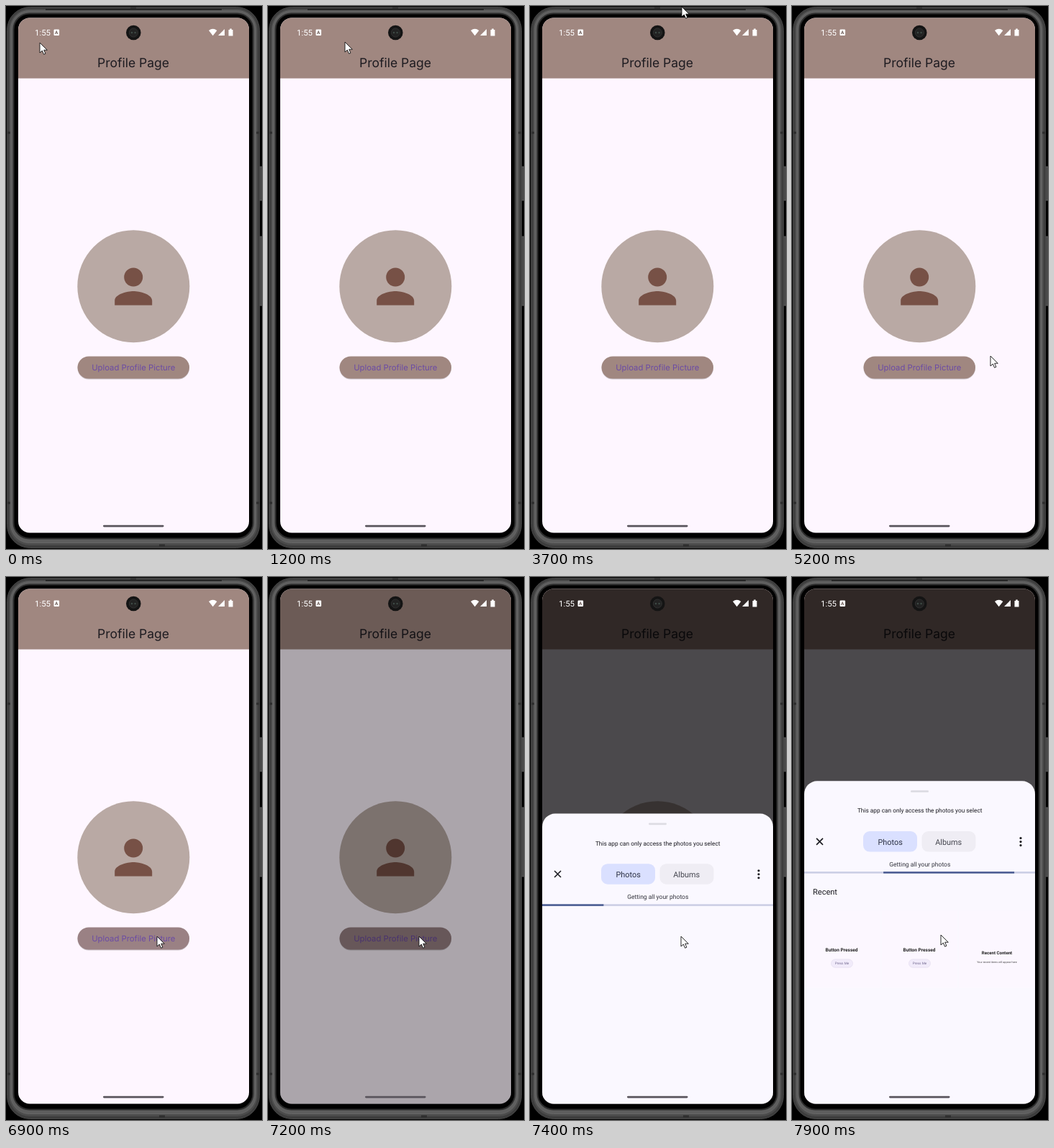
These frames come from a looping animation (356 by 754 pixels, 8 s). An HTML page:

```html
<!DOCTYPE html>
<html lang="en">
<head>
<meta charset="utf-8">
<title>Profile Page</title>
<style>
html, body { margin: 0; width: 100%; height: 100%; overflow: hidden; background: #000; }
svg { display: block; width: 356px; height: 754px; }
text { font-family: Roboto, sans-serif; text-rendering: geometricPrecision; text-anchor: middle; }
.brand { font-family: Inter, sans-serif; }
</style>
</head>
<body>
<svg viewBox="0 0 356 754" xmlns="http://www.w3.org/2000/svg">
  <defs>
    <clipPath id="screen"><rect x="17" y="16.5" width="321" height="715" rx="16"/></clipPath>
  </defs>

  <!-- phone body: nested outlines from the outer edge to the bezel -->
  <rect width="356" height="754"/>
  <g fill="#4a4a4a" stroke="#666" stroke-width=".7">
    <rect x="351" y="223" width="6" height="47" rx="1.5"/>
    <rect x="351" y="320" width="6" height="96" rx="1.5"/>
  </g>
  <rect x="1.5" y="1.5" width="351" height="751" rx="32" fill="#3d3d3d" stroke="#454545"/>
  <rect x="4" y="4" width="346" height="745" rx="29" fill="#4c4c4c"/>
  <rect x="6.5" y="6.5" width="341" height="739" rx="26" fill="#5e5e5e" stroke="#666"/>
  <rect x="10.5" y="10.5" width="333" height="729" rx="22" stroke="#2c2c2c" stroke-width="2"/>
  <path d="M55 5H300" stroke="#262626" stroke-width="2"/>
  <path d="M173 3h8M2 176h4M348 176h4M2 690h4M348 690h4M213 749h8" stroke="#2e2e2e" stroke-width="3"/>

  <g clip-path="url(#screen)">
    <rect x="17" y="16" width="321" height="716" fill="#fef6ff"/>
    <rect x="17" y="16" width="321" height="84.5" fill="#a08780"/>
    <text class="brand" x="177" y="85" font-size="17.5" fill="#1d1b20">Profile Page</text>
    <circle cx="177.3" cy="389.3" r="78" fill="#b9a9a4"/>
    <path transform="translate(138.2 350.5) scale(3.25)" fill="#775146"
      d="M12 12a4 4 0 1 0 0-8 4 4 0 0 0 0 8zm0 2c-2.67 0-8 1.34-8 4v2h16v-2c0-2.66-5.33-4-8-4z"/>
    <rect x="99.5" y="487.5" width="155.5" height="31" rx="15.5" fill="#000" opacity=".18"/>
    <rect x="99.5" y="486.5" width="155.5" height="31" rx="15.5" fill="#a08780"/>
    <rect id="hover" x="99.5" y="486.5" width="155.5" height="31" rx="15.5" fill="#6750a4"/>
    <text class="brand" x="177.3" y="506" font-size="11.3" fill="#6b4ba5">Upload Profile Picture</text>
    <rect id="scrim" x="17" y="16" width="321" height="716"/>

    <g id="sheet">
      <rect x="17" width="321" height="500" rx="18" fill="#faf8ff"/>
      <rect x="165" y="13" width="25" height="2.6" rx="1.3" fill="#dddce3"/>
      <text x="177.7" y="44" font-size="8.3" fill="#1b1b21">This app can only access the photos you select</text>
      <rect x="99" y="69.7" width="75" height="28.5" rx="9" fill="#dae0ff"/>
      <rect x="180.5" y="69.7" width="75" height="28.5" rx="9" fill="#efedf4"/>
      <text x="136.7" y="88.2" font-size="10.9" fill="#2b3042">Photos</text>
      <text x="217.7" y="88.2" font-size="10.9" fill="#45464f">Albums</text>
      <path d="M34 79.5l9 9m0-9l-9 9" stroke="#1b1b21" stroke-width="1.6"/>
      <g fill="#1b1b21">
        <circle cx="318" cy="79.2" r="1.6"/><circle cx="318" cy="84.2" r="1.6"/><circle cx="318" cy="89.2" r="1.6"/>
      </g>
      <text x="177.8" y="118.4" font-size="8.5" fill="#33343c">Getting all your photos</text>
      <rect x="17" y="125.8" width="321" height="2.5" fill="#cacde4"/>
      <rect id="bar" y="125.8" height="2.5" fill="#4a5c92"/>
      <g id="recent">
        <text x="46" y="158" font-size="11" fill="#1b1b21">Recent</text>
        <g id="cells" fill="#fcf7ff"></g>
      </g>
    </g>

    <rect x="135" y="720.7" width="84.5" height="2.7" rx="1.35" fill="#59545c"/>
    <text x="51" y="40.5" font-size="11.4" fill="#fff">1:55</text>
    <g fill="#fff">
      <rect x="66.5" y="32.5" width="7.6" height="8.4" rx="1.2"/>
      <path d="M282 34Q287.7 29.4 293.4 34L287.7 41.2ZM304 32V41H295ZM309.5 33h1.7v-1.4h2.6V33h1.7v8.4h-6z"/>
    </g>
    <text x="70.3" y="39.2" font-size="6.5" font-weight="700" fill="#6b5a55">A</text>
  </g>

  <circle cx="177.3" cy="37" r="10.3" fill="#141414"/>
  <circle cx="177.3" cy="37" r="6" fill="#222" stroke="#303030"/>
  <circle cx="175" cy="37" r="1.3" fill="#3d4a45"/>
  <circle cx="179.6" cy="37" r="1.3" fill="#3d4a45"/>

  <path id="cursor" d="M0 0V14L3.3 11L5.6 16.2L7.9 15.2L5.7 10.2H10.3Z" fill="#fff" stroke="#111" stroke-width=".9"/>
</svg>
<script>
const LOOP = 8000, STEP = 100;
const $ = id => document.getElementById(id);
const set = (id, attrs) => {
  for (const k in attrs) $(id).setAttribute(k, attrs[k]);
};
const smooth = s => s * s * (3 - 2 * s);
const clamp = v => Math.min(1, Math.max(0, v));

// Each path: [end time, [time, x, y], ...]; the pointer is off stage between paths.
const paths = [
  [1600, [0, 47, 51], [100, 46, 51], [300, 47, 51], [600, 48, 51], [900, 104, 51],
    [1100, 104, 51], [1200, 107, 50], [1400, 107, 50], [1500, 100, 50]],
  [2200, [2000, 2, 14]],
  [4300, [3700, 211, 1], [4000, 214, 51], [4200, 215, 51]],
  [LOOP, [5000, 322, 498], [5200, 276, 486], [5300, 248, 483], [5500, 214, 497],
    [5600, 210, 499], [7600, 210, 499], [7800, 207, 497]]
];

function pointer(t) {
  const path = paths.find(([end, first]) => t >= first[0] && t < end);
  if (!path) return null;
  const keys = path.slice(1);
  const i = keys.findLastIndex(k => k[0] <= t);
  const a = keys[i], b = keys[i + 1] || a;
  const p = b === a ? 0 : (t - a[0]) / (b[0] - a[0]);
  return [a[1] + (b[1] - a[1]) * p, a[2] + (b[2] - a[2]) * p];
}

function buildCells() {
  const label = (x, y, size, weight, color, s) =>
    `<text x="${x}" y="${y}" font-size="${size}" font-weight="${weight}" fill="${color}">${s}</text>`;
  let out = "";
  for (let i = 0; i < 3; i++) out += `<rect x="${17 + i * 107.5}" y="180" width="106" height="107"/>`;
  for (const x of [69, 177]) {
    out += label(x, 236.5, 6.5, 700, "#222", "Button Pressed");
    out += `<rect x="${x - 14.5}" y="247.5" width="30" height="11.5" rx="5.7" fill="#f1ebfa" stroke="#e2dcec" stroke-width=".6"/>`;
    out += label(x + 0.5, 254.8, 4.7, 400, "#746a92", "Press Me");
  }
  out += label(285, 241, 6.1, 700, "#222", "Recent Content");
  out += label(285, 252.6, 3.7, 400, "#444", "Your recent items will appear here");
  $("cells").innerHTML = out;
}

function draw(t) {
  const pos = pointer(t);
  set("cursor", pos
    ? { visibility: "visible", transform: `translate(${pos[0]} ${pos[1]})` }
    : { visibility: "hidden" });

  set("hover", { opacity: t < 6000 ? 0 : t < 6600 ? 0.08 : 0.1 });
  set("scrim", { opacity: t < 7200 ? 0 : t < 7300 ? 0.33 : 0.7 });

  const open = t >= 7300;
  set("sheet", { visibility: open ? "visible" : "hidden" });
  set("recent", { display: t >= 7600 ? "inline" : "none" });
  set("cells", { display: t >= 7700 ? "inline" : "none" });
  if (!open) return;

  const dt = t - 7300;
  set("sheet", { transform: `translate(0 ${283.2 + 147 * Math.exp(-dt / 85)})` });
  const head = smooth(clamp(0.243 + 0.572 * dt / 600));
  const tail = 0.343 * clamp((dt - 150) / 450) ** 1.7;
  set("bar", { x: 17 + 321 * tail, width: 321 * (head - tail) });
}

function tick() {
  const t = performance.now() % LOOP;
  draw(Math.floor(t / STEP) * STEP);
  requestAnimationFrame(tick);
}

buildCells();
tick();
</script>
</body>
</html>
```
